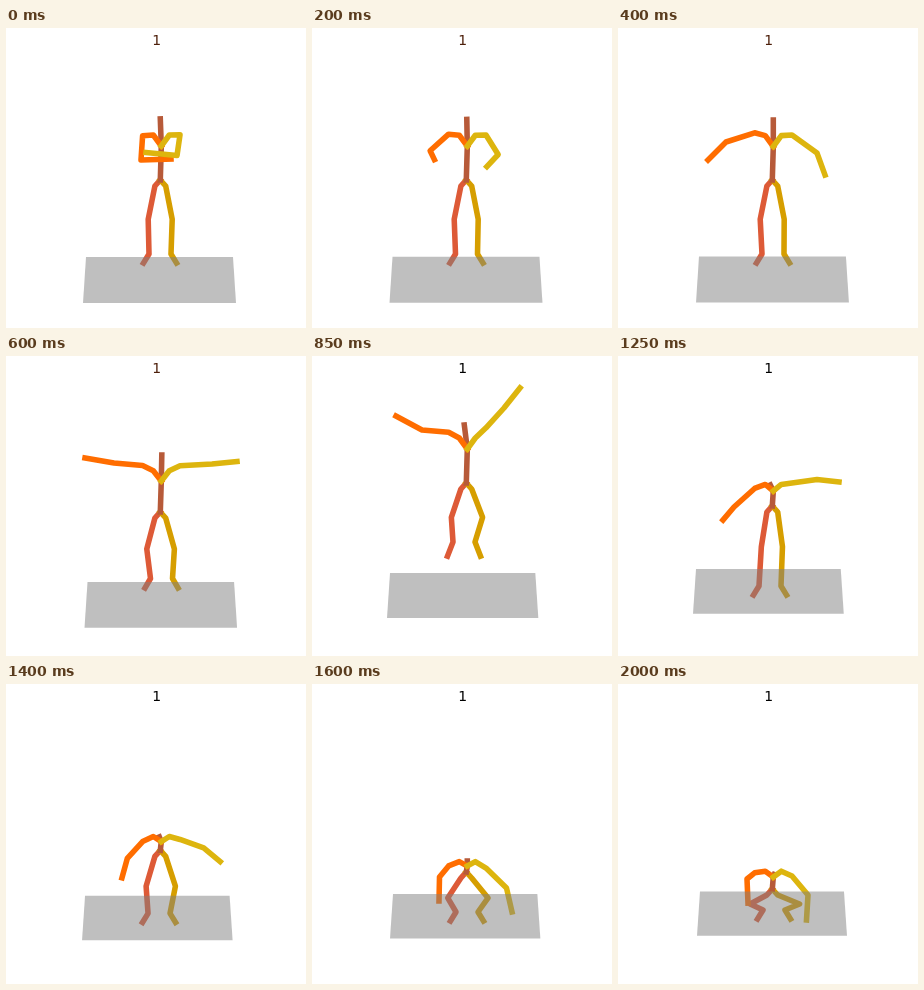
An HTML page with a canvas that plays this animation: 300 px wide and 300 px high, repeating every 2050 ms.

```html
<!DOCTYPE html>
<html>
<head>
<meta charset="utf-8">
<style>
html, body { margin: 0; width: 100%; height: 100%; overflow: hidden; background: #fff; }
canvas { display: block; width: 300px; height: 300px; }
</style>
</head>
<body>
<canvas id="stage" width="300" height="300"></canvas>
<script>
const LOOP = 2050, STEP = 50;

// Key poses: stand, spread, swing, leap, land, squat, crouch.
const times = [0, 400, 600, 850, 1250, 1600, 2000];
const body = {
  drift: [-1, 0, 0.5, -3, -3, 0, 1],
  floor: [229, 228.5, 226, 217, 213, 210, 207.5],
  pelvis: [152, 152, 156, 127, 150, 188, 205],
  chest: [118, 118.5, 125, 93, 135, 182, 193],
  head: [91, 92, 99, 69, 129, 177, 190.5],
  ankle: [226, 226, 222.5, 186, 230, 228, 226]
};
const rightArm = {
  elbow: [[135, 132], [108, 114], [108, 107], [110, 74], [116, 151], [127.5, 193], [129, 195]],
  wrist: [[165, 131], [90, 132], [79, 102], [84, 60], [105, 164], [127, 217], [130, 219]]
};
const leftArm = {
  elbow: [[171, 127.5], [199, 125], [206, 108], [192, 52], [199, 123.5], [194.5, 204], [190, 211]],
  wrist: [[140, 124.5], [207, 147], [231, 105.5], [208, 32], [221, 126], [200, 228], [188.5, 236]]
};

const ctx = document.getElementById("stage").getContext("2d");

// Monotone cubic interpolation: eases through keys without overshoot.
function ease(keys, t) {
  let i = 0;
  while (i < times.length - 2 && t >= times[i + 1]) i++;
  const span = times[i + 1] - times[i], u = (t - times[i]) / span;
  const slope = k => (keys[k + 1] - keys[k]) / (times[k + 1] - times[k]);
  const tangent = k => {
    if (k === 0) return slope(0);
    if (k === times.length - 1) return slope(k - 1);
    const a = slope(k - 1), b = slope(k);
    return a * b > 0 ? 2 * a * b / (a + b) : 0;
  };
  return keys[i] + (keys[i + 1] - keys[i]) * u * u * (3 - 2 * u)
    + span * u * (1 - u) * (tangent(i) * (1 - u) - tangent(i + 1) * u);
}

function trace(points) {
  ctx.beginPath();
  points.forEach(p => ctx.lineTo(...p));
}

function limb(color, points) {
  trace(points);
  ctx.strokeStyle = color;
  ctx.stroke();
}

// The more the leg is compressed, the further the knee moves out and down.
function leg(side, root, ankleY, drift) {
  const squeeze = 74 - (ankleY - root[1]);
  const knee = [
    154.2 + 0.05 * squeeze + side * (12 + 0.24 * squeeze),
    root[1] + (ankleY - root[1]) * (0.53 + 0.0035 * squeeze)
  ];
  const ankle = [155 + drift + side * 11, ankleY];
  const droop = 9 + 0.13 * Math.max(0, 226 - ankleY);
  return [root, [root[0] + side * 5.4, root[1] + 6], knee, ankle,
    [ankle[0] + side * 5.5, ankleY + droop]];
}

// Shoulders follow the lean of the torso and the height of the elbow.
function arm(side, chest, upright, elbow, wrist) {
  const [x, y] = chest;
  const collar = [x + side * 8, y - 3 - 8 * upright];
  const shoulder = [x + side * 18.7, y - 13 * upright + 0.2 * (elbow[1] - y)];
  return [chest, collar, shoulder, elbow, wrist];
}

function drawFloor(x, y) {
  const back = 229 - y, w = 147 - 0.14 * back, h = 46 - 0.08 * back;
  trace([[x, y], [x + w, y], [x + w + 3, y + h], [x - 3, y + h]]);
  ctx.fillStyle = "rgba(128,128,128,0.5)";
  ctx.fill();
}

function draw(t) {
  const at = name => ease(body[name], t);
  const point = keys => [0, 1].map(axis => ease(keys.map(p => p[axis]), t));
  const drift = at("drift"), ankleY = at("ankle");
  const root = [154.3, at("pelvis")], chest = [155.3, at("chest")];
  const upright = (root[1] - chest[1]) / 34;

  ctx.fillStyle = "#fff";
  ctx.fillRect(0, 0, 300, 300);

  ctx.lineWidth = 5.56;
  ctx.lineCap = "square";
  ctx.lineJoin = "round";
  limb("#DD5A37", leg(-1, root, ankleY, drift));
  limb("#D69E00", leg(1, root, ankleY, drift));
  limb("#B75A39", [root, chest, [chest[0] + drift, at("head")]]);
  limb("#FF6D00", arm(-1, chest, upright, point(rightArm.elbow), point(rightArm.wrist)));
  limb("#DDB50E", arm(1, chest, upright, point(leftArm.elbow), point(leftArm.wrist)));
  drawFloor(81 + drift, at("floor"));

  ctx.fillStyle = t < 750 ? "#4d1f0a" : "#000";
  ctx.font = '13.9px "DejaVu Sans", sans-serif';
  ctx.textAlign = "center";
  ctx.fillText("1", 150.6, 17);
}

function tick() {
  draw(Math.floor(performance.now() % LOOP / STEP) * STEP);
  requestAnimationFrame(tick);
}
tick();
</script>
</body>
</html>
```
